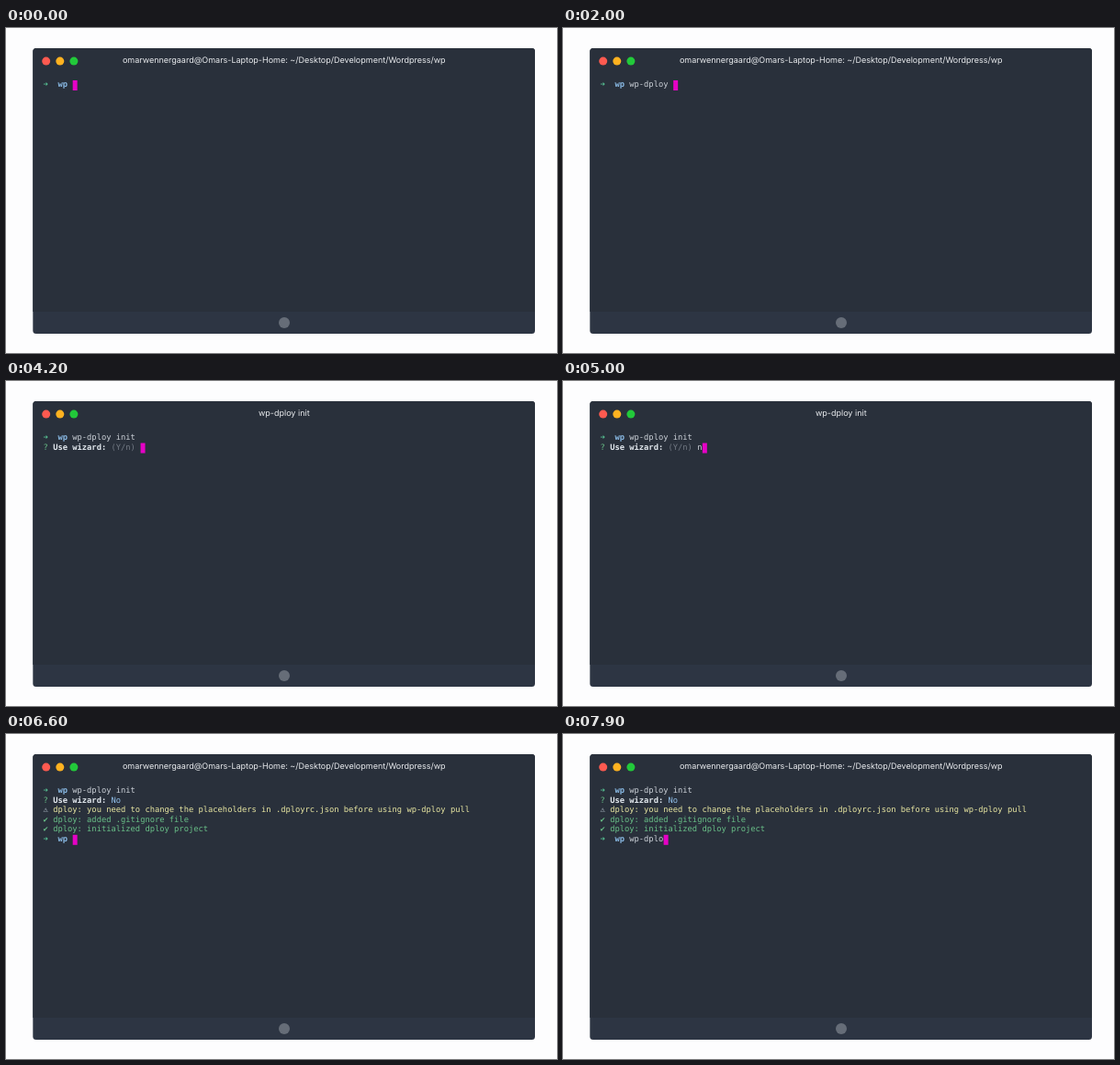
These frames come from a looping animation (600 by 354 pixels, 8 s). An HTML page:

```html
<!DOCTYPE html>
<html lang="en">
<head>
<meta charset="utf-8">
<title>Terminal</title>
<style>
  html, body { margin: 0; width: 100%; height: 100%; overflow: hidden; background: #fdfdfe; }
  body { position: relative; text-rendering: geometricPrecision; }

  .window { position: absolute; left: 0; top: 0; }

  .title {
    position: absolute; left: 29.5px; width: 546.5px; top: 29px;
    text-align: center; white-space: pre; color: #e9ebee;
    font: 9px/13px Inter, "Open Sans", sans-serif;
  }

  .screen {
    position: absolute; left: 40.6px; top: 57px; color: #cdd2d9;
    font: 8.78px/10.56px "DejaVu Sans Mono", "Liberation Mono", monospace;
  }
  .row { display: flex; height: 10.56px; white-space: pre; }
  .icon { width: 2ch; }
  .prompt .icon { width: 3ch; color: #58c796; }
  .dir { width: 3ch; font-weight: bold; color: #8abbe6; }
  .cmd { overflow: hidden; }
  .ok { color: #69c088; }
  .warn { color: #e9e7a2; }
  .warn .icon { color: #c5d3de; }
  .ask { font-weight: bold; color: #e3e9ef; width: 12ch; }
  .hint { color: #737a85; }
  .reply { position: relative; }
  .reply > span { position: absolute; left: 0; }
  .no { color: #92c1ec; }
  .cursor { position: absolute; left: 0; top: 0; width: 1ch; height: 10.8px; background: #e502c5; }

  /* All states switch hard, on one shared 8 s clock. */
  .anim { animation: 8s step-end -10ms infinite; }
  .cmd1 { animation-name: type1; }
  .cmd2 { animation-name: type2; }
  .cursor { animation-name: cursor; }
  .path { animation-name: path; }
  .running { animation-name: running; }
  .question { animation-name: question; }
  .pending { animation-name: pending; }
  .key { animation-name: key; }
  .done { animation-name: done; }

  @keyframes type1 {
    0% { width: 0 }
    6.25% { width: 1ch }
    7.5% { width: 2ch }
    10% { width: 3ch }
    12.5% { width: 4ch }
    13.75% { width: 5ch }
    16.25% { width: 7ch }
    17.5% { width: 9ch }
    26.25% { width: 10ch }
    28.75% { width: 12ch }
    42.5%, 100% { width: 13ch }
  }
  @keyframes type2 {
    0% { width: 0 }
    86.25% { width: 1ch }
    87.5% { width: 2ch }
    90% { width: 3ch }
    92.5% { width: 4ch }
    95% { width: 5ch }
    96.25% { width: 6ch }
    98.75%, 100% { width: 7ch }
  }
  @keyframes cursor {
    0% { transform: translate(6ch, 0) }
    6.25% { transform: translate(7ch, 0) }
    7.5% { transform: translate(8ch, 0) }
    10% { transform: translate(9ch, 0) }
    12.5% { transform: translate(10ch, 0) }
    13.75% { transform: translate(11ch, 0) }
    16.25% { transform: translate(13ch, 0) }
    17.5% { transform: translate(15ch, 0) }
    26.25% { transform: translate(16ch, 0) }
    28.75% { transform: translate(18ch, 0) }
    42.5% { transform: translate(19ch, 0) }
    43.75% { transform: translate(0, 10.56px) }
    52.5% { transform: translate(20ch, 10.56px) }
    62.5% { transform: translate(21ch, 10.56px) }
    66.25% { transform: translate(6ch, 52.8px) }
    86.25% { transform: translate(7ch, 52.8px) }
    87.5% { transform: translate(8ch, 52.8px) }
    90% { transform: translate(9ch, 52.8px) }
    92.5% { transform: translate(10ch, 52.8px) }
    95% { transform: translate(11ch, 52.8px) }
    96.25% { transform: translate(12ch, 52.8px) }
    98.75%, 100% { transform: translate(13ch, 52.8px) }
  }
  @keyframes path { 0%, 66.25%, 100% { opacity: 1 } 43.75% { opacity: 0 } }
  @keyframes running { 0%, 66.25%, 100% { opacity: 0 } 43.75% { opacity: 1 } }
  @keyframes question { 0% { opacity: 0 } 52.5%, 100% { opacity: 1 } }
  @keyframes pending { 0% { opacity: 1 } 66.25%, 100% { opacity: 0 } }
  @keyframes key { 0% { opacity: 0 } 62.5%, 100% { opacity: 1 } }
  @keyframes done { 0% { opacity: 0 } 66.25%, 100% { opacity: 1 } }
</style>
</head>
<body>
  <svg class="window" width="600" height="354">
    <rect x="29.3" y="22" width="546.7" height="311" rx="3.5" fill="#2d3543"/>
    <path d="M29.3 309V25.5a3.5 3.5 0 0 1 3.5-3.5H572.5a3.5 3.5 0 0 1 3.5 3.5V309z" fill="#29303b"/>
    <circle cx="43.7" cy="36.1" r="4.5" fill="#ff5a50"/>
    <circle cx="58.8" cy="36.1" r="4.5" fill="#ffb220"/>
    <circle cx="73.9" cy="36.1" r="4.5" fill="#22c93a"/>
    <circle cx="303" cy="321" r="6" fill="#666d78"/>
  </svg>

  <div class="title anim path">omarwennergaard@Omars-Laptop-Home: ~/Desktop/Development/Wordpress/wp</div>
  <div class="title anim running">wp-dploy init</div>

  <div class="screen">
    <div class="row prompt"><span class="icon">➜</span><span class="dir">wp</span><span class="cmd anim cmd1">wp-dploy init</span></div>
    <div class="row anim question"><span class="icon ok">?</span><span class="ask">Use wizard:</span><span class="reply"><span class="anim pending"><span class="hint">(Y/n) </span><span class="anim key">n</span></span><span class="no anim done">No</span></span></div>
    <div class="row warn anim done"><span class="icon">⚠&#xFE0E;</span><span>dploy: you need to change the placeholders in .dployrc.json before using wp-dploy pull</span></div>
    <div class="row ok anim done"><span class="icon">✔&#xFE0E;</span><span>dploy: added .gitignore file</span></div>
    <div class="row ok anim done"><span class="icon">✔&#xFE0E;</span><span>dploy: initialized dploy project</span></div>
    <div class="row prompt anim done"><span class="icon">➜</span><span class="dir">wp</span><span class="cmd anim cmd2">wp-dploy</span></div>
    <div class="cursor anim"></div>
  </div>
</body>
</html>
```
